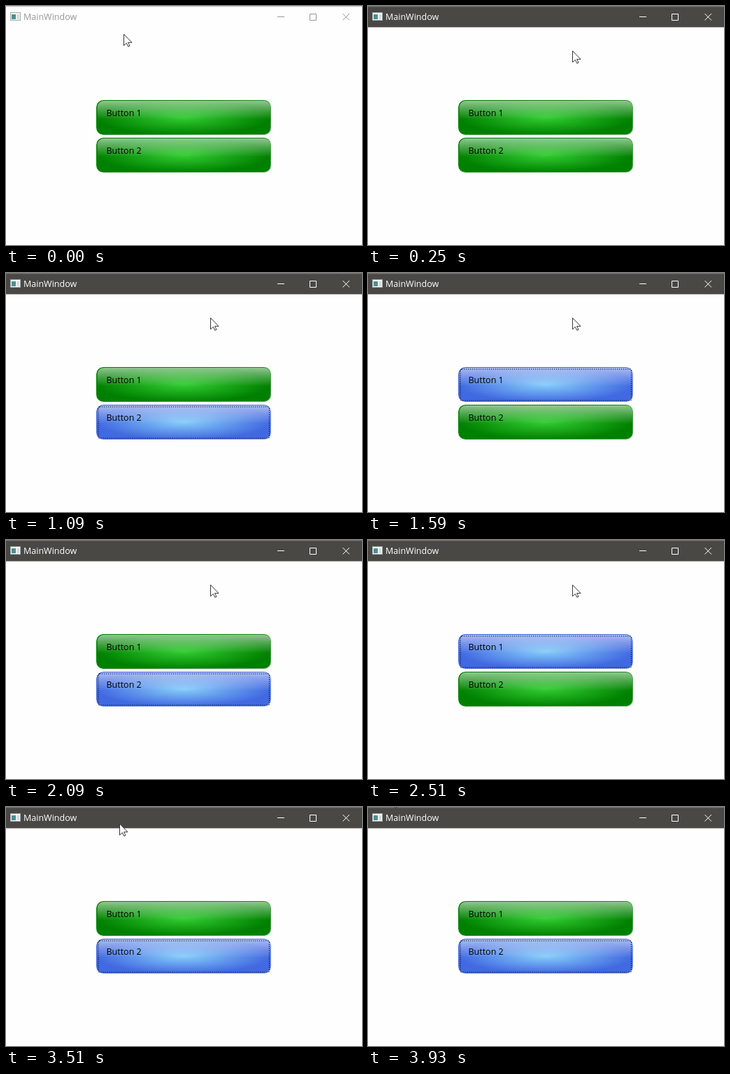
Recreate the animation shown at these times as an HTML page. Size 509x343 px, loop 4010 ms.

```html
<!DOCTYPE html>
<html lang="en">
<head>
<meta charset="utf-8">
<title>MainWindow</title>
<style>
  html, body { margin: 0; width: 100%; height: 100%; overflow: hidden; background: #fefefe; }
  svg { display: block; width: 509px; height: 343px; }
  text { font: 12.5px "Open Sans", "Noto Sans", sans-serif; }
  .caption { stroke: currentColor; fill: none; }
</style>
</head>
<body>
<svg viewBox="0 0 509 343">
  <defs>
    <radialGradient id="green">
      <stop stop-color="#32cd32"/><stop offset="1" stop-color="#008000"/>
    </radialGradient>
    <radialGradient id="blue">
      <stop stop-color="#87cefa"/><stop offset="1" stop-color="#4169e1"/>
    </radialGradient>
    <linearGradient id="gloss" x2="0" y2="1">
      <stop stop-color="#fff" stop-opacity=".56"/>
      <stop offset=".55" stop-color="#fff" stop-opacity="0"/>
    </linearGradient>
    <linearGradient id="rim" y2="1">
      <stop offset=".3" stop-color="#ccc" stop-opacity="0"/>
      <stop offset="1" stop-color="#ccc" stop-opacity=".55"/>
    </linearGradient>
  </defs>

  <rect id="bar" width="509" height="30.5"/>
  <rect id="edge" width="509" height="1.3"/>
  <g id="icon">
    <rect x="6.5" y="9.5" width="14" height="11" fill="#f4f6f6" stroke="#a4a9aa"/>
    <path d="M8 12h6v7H8z" fill="#4b8f92"/>
    <path d="M15.5 12h3.5v7h-3.5z" fill="#d3dcde"/>
  </g>
  <g id="title">
    <text x="25" y="20" fill="currentColor">MainWindow</text>
    <path class="caption" d="M388 15.5h10M434.5 11.5h9v9h-9zM481.500 11l9.500 9.500M491 11l-9.500 9.500"/>
  </g>

  <g id="buttons"></g>

  <path id="cursor" d="M.5 .5V16.800L4.300 13.300 6.800 18.300 9 17.300 6.600 12.400H12z"
        fill="#fff" stroke="#222" stroke-width=".9"/>
</svg>
<script>
const $ = id => document.getElementById(id);
const LOOP = 4010;
const FOCUS_TIMES = [590, 1090, 1590, 2090, 2510, 3010];

$('buttons').innerHTML = [1, 2].map(n => `
  <g transform="translate(129 ${81 + 54 * n})">
    <rect class="face" width="250" height="50" rx="10.500"/>
    <rect x="1.500" y="1" width="248" height="48" rx="9.500" fill="url(#gloss)"/>
    <rect x=".5" y=".5" width="249" height="49" rx="10" fill="none" stroke="url(#rim)"/>
    <rect class="focus" x="3" y="3" width="244.500" height="45" rx="2" fill="none"
          stroke="#061038" stroke-width="1.200" stroke-dasharray="1.250 1.750"/>
    <text x="14.500" y="22.500">Button ${n}</text>
  </g>`).join('');

const faces = document.querySelectorAll('.face');
const rings = document.querySelectorAll('.focus');

// Fraction of a move made in whole steps, the first one taken at start.
const stepped = (t, start, gap, count) =>
  Math.max(0, Math.min(count, Math.floor((t - start) / gap) + 1)) / count;

function draw(t) {
  const active = t >= 250;
  $('bar').setAttribute('fill', active ? '#4a4845' : '#fefefe');
  $('edge').setAttribute('fill', active ? '#777572' : '#c8c8c8');
  $('title').style.color = active ? '#fff' : '#969696';

  const presses = FOCUS_TIMES.filter(time => t >= time).length;
  const focused = presses ? (presses - 1) % 2 : -1;
  faces.forEach((face, i) => {
    face.setAttribute('fill', i === focused ? 'url(#blue)' : 'url(#green)');
    rings[i].style.display = i === focused ? '' : 'none';
  });

  const enter = stepped(t, 90, 80, 3);
  const leave = stepped(t, 3165, 84.5, 10);
  const x = 168 + 124 * enter - 260 * leave;
  const y = 40 + 24 * enter - 81 * leave;
  $('cursor').setAttribute('transform', `translate(${x} ${y})`);
}

const begin = performance.now();
function tick() {
  draw((performance.now() - begin) % LOOP);
  requestAnimationFrame(tick);
}
tick();
</script>
</body>
</html>
```
